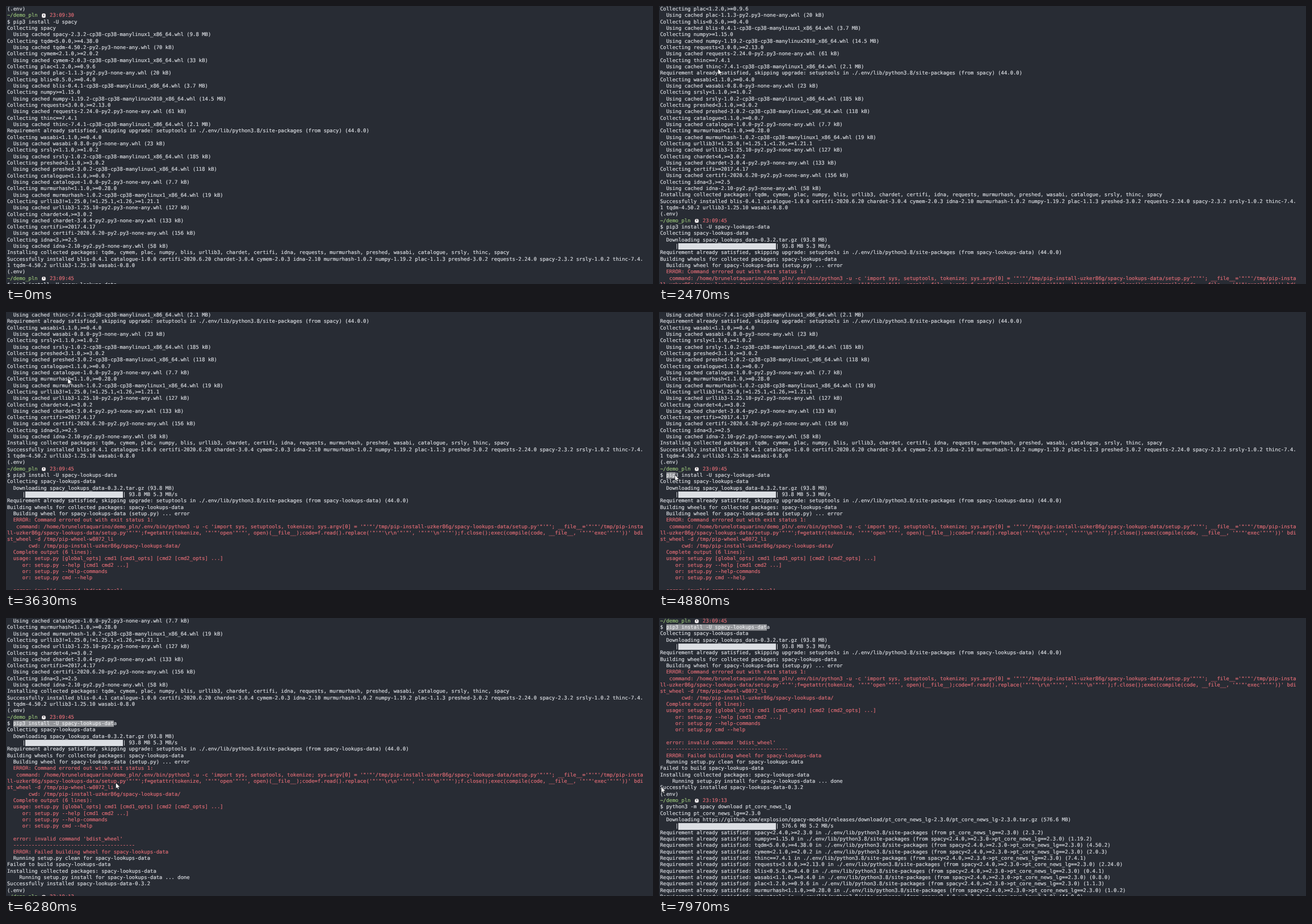
Write an HTML page that moves like this. It is 1140 by 491 pixels and loops after 8 s.

```html
<!DOCTYPE html>
<html lang="en">
<head>
<meta charset="utf-8">
<title>Terminal session</title>
<style>
  html, body { margin: 0; width: 100%; height: 100%; overflow: hidden; background: #282c34; }
  #stage { position: relative; width: 1140px; height: 491px; overflow: hidden; --row: 11.328125px; }
  #log {
    position: absolute; left: 2px; top: 0;
    font: 8.92px/12px "DejaVu Sans Mono", monospace;
    text-rendering: geometricPrecision; font-variant-ligatures: none;
    white-space: pre; color: #dcdfe4; -webkit-text-stroke: .2px;
  }
  #log div { position: relative; height: var(--row); }
  #log .red { color: #e06c75; }
  .green { color: #98c379; }
  .bar { display: inline-block; height: var(--row); vertical-align: top; background: #dcdfe4; }
  .clock {
    position: absolute; left: 60.9px; top: 1.9px; width: 7.6px; height: 7.6px;
    border-radius: 50%; background: #eceef0; box-shadow: inset 0 0 0 .5px #c9b9bb;
  }
  .clock::after {
    content: ""; position: absolute; left: 3.2px; top: 1.4px; width: 1.2px; height: 2.9px; background: #4a3338;
  }
  #pick { position: absolute; top: 0; height: var(--row); background: rgba(255, 255, 255, .5); }
  #pointer { position: absolute; left: 0; top: 0; width: 10px; height: 14px; overflow: visible; }
</style>
</head>
<body>
<div id="stage">
  <div id="log"></div>
  <svg id="pointer"><path d="M0 0V10.4L2.4 8.3 4 11.8 5.6 11.1 4.1 7.7H7.4Z" fill="#fff" stroke="#16181c" stroke-width=".6"/></svg>
</div>
<script>
// ROW is a whole number of 1/64 px, so stacked rows never drift from the scroll.
const LOOP = 8000, COL = 5.37, ROW = 725 / 64, LEFT = 2;
const log = document.getElementById('log');
const pointer = document.getElementById('pointer');

function span(text, cls) {
  const s = document.createElement('span');
  s.className = cls || '';
  s.textContent = text;
  return s;
}
function row(...parts) {
  const d = document.createElement('div');
  d.append(...parts);
  log.append(d);
  return d;
}
const print = text => text.split('\n').forEach(line => row(line));
const fail = text => text.split('\n').forEach(line => { row(line).className = 'red'; });
const prompt = time => row(span('~/demo_pln', 'green'), span('', 'clock'), '    ', span(time, 'red'));
const progress = text => row('     |', span(' '.repeat(32), 'bar'), '| ' + text);

const SITE = 'in ./.env/lib/python3.8/site-packages';
const LINUX = 'cp38-cp38-manylinux1_x86_64', ANY = 'py2.py3-none-any';
const MODEL = 'pt_core_news_lg';

function collect(name, range, version, tag, size) {
  print(`Collecting ${name}${range}\n  Using cached ${name}-${version}-${tag}.whl (${size})`);
}
const skip = from =>
  print(`Requirement already satisfied, skipping upgrade: setuptools ${SITE} (from ${from}) (44.0.0)`);
const satisfied = (spec, version, from = `spacy<2.4.0,>=2.3.0->${MODEL}==2.3.0`) =>
  print(`Requirement already satisfied: ${spec} ${SITE} (from ${from}) (${version})`);

print('(.env)');
prompt('23:09:30');
print('$ pip3 install -U spacy');
collect('spacy', '', '2.3.2', LINUX, '9.8 MB');
collect('tqdm', '<5.0.0,>=4.38.0', '4.50.2', ANY, '70 kB');
collect('cymem', '<2.1.0,>=2.0.2', '2.0.3', LINUX, '33 kB');
collect('plac', '<1.2.0,>=0.9.6', '1.1.3', ANY, '20 kB');
collect('blis', '<0.5.0,>=0.4.0', '0.4.1', LINUX, '3.7 MB');
collect('numpy', '>=1.15.0', '1.19.2', LINUX.replace('x1_', 'x2010_'), '14.5 MB');
collect('requests', '<3.0.0,>=2.13.0', '2.24.0', ANY, '61 kB');
collect('thinc', '==7.4.1', '7.4.1', LINUX, '2.1 MB');
skip('spacy');
collect('wasabi', '<1.1.0,>=0.4.0', '0.8.0', 'py3-none-any', '23 kB');
collect('srsly', '<1.1.0,>=1.0.2', '1.0.2', LINUX, '185 kB');
collect('preshed', '<3.1.0,>=3.0.2', '3.0.2', LINUX, '118 kB');
collect('catalogue', '<1.1.0,>=0.0.7', '1.0.0', ANY, '7.7 kB');
collect('murmurhash', '<1.1.0,>=0.28.0', '1.0.2', LINUX, '19 kB');
collect('urllib3', '!=1.25.0,!=1.25.1,<1.26,>=1.21.1', '1.25.10', ANY, '127 kB');
collect('chardet', '<4,>=3.0.2', '3.0.4', ANY, '133 kB');
collect('certifi', '>=2017.4.17', '2020.6.20', ANY, '156 kB');
collect('idna', '<3,>=2.5', '2.10', ANY, '58 kB');
print(`Installing collected packages: tqdm, cymem, plac, numpy, blis, urllib3, chardet, certifi, idna, requests, murmurhash, preshed, wasabi, catalogue, srsly, thinc, spacy
Successfully installed blis-0.4.1 catalogue-1.0.0 certifi-2020.6.20 chardet-3.0.4 cymem-2.0.3 idna-2.10 murmurhash-1.0.2 numpy-1.19.2 plac-1.1.3 preshed-3.0.2 requests-2.24.0 spacy-2.3.2 srsly-1.0.2 thinc-7.4.
1 tqdm-4.50.2 urllib3-1.25.10 wasabi-0.8.0
(.env)`);
prompt('23:09:45');
const picked = row('$ pip3 install -U spacy-lookups-data');
print(`Collecting spacy-lookups-data
  Downloading spacy_lookups_data-0.3.2.tar.gz (93.8 MB)`);
progress('93.8 MB 5.3 MB/s');
skip('spacy-lookups-data');
print(`Building wheels for collected packages: spacy-lookups-data
  Building wheel for spacy-lookups-data (setup.py) ... error`);
fail(String.raw`  ERROR: Command errored out with exit status 1:
   command: /home/brunelotaquarino/demo_pln/.env/bin/python3 -u -c 'import sys, setuptools, tokenize; sys.argv[0] = '"'"'/tmp/pip-install-uzker86g/spacy-lookups-data/setup.py'"'"'; __file__='"'"'/tmp/pip-insta
ll-uzker86g/spacy-lookups-data/setup.py'"'"';f=getattr(tokenize, '"'"'open'"'"', open)(__file__);code=f.read().replace('"'"'\r\n'"'"', '"'"'\n'"'"');f.close();exec(compile(code, __file__, '"'"'exec'"'"'))' bdi
st_wheel -d /tmp/pip-wheel-w8072_li
       cwd: /tmp/pip-install-uzker86g/spacy-lookups-data/
  Complete output (6 lines):
  usage: setup.py [global_opts] cmd1 [cmd1_opts] [cmd2 [cmd2_opts] ...]
     or: setup.py --help [cmd1 cmd2 ...]
     or: setup.py --help-commands
     or: setup.py cmd --help

  error: invalid command 'bdist_wheel'`);
fail('  ' + '-'.repeat(40) + '\n  ERROR: Failed building wheel for spacy-lookups-data');
print(`  Running setup.py clean for spacy-lookups-data
Failed to build spacy-lookups-data
Installing collected packages: spacy-lookups-data
    Running setup.py install for spacy-lookups-data ... done
Successfully installed spacy-lookups-data-0.3.2
(.env)`);
prompt('23:19:13');
print(`$ python3 -m spacy download ${MODEL}
Collecting ${MODEL}==2.3.0
  Downloading https://github.com/explosion/spacy-models/releases/download/${MODEL}-2.3.0/${MODEL}-2.3.0.tar.gz (576.6 MB)`);
progress('576.6 MB 5.2 MB/s');
satisfied('spacy<2.4.0,>=2.3.0', '2.3.2', MODEL + '==2.3.0');
satisfied('numpy>=1.15.0', '1.19.2');
satisfied('tqdm<5.0.0,>=4.38.0', '4.50.2');
satisfied('cymem<2.1.0,>=2.0.2', '2.0.3');
satisfied('thinc==7.4.1', '7.4.1');
satisfied('requests<3.0.0,>=2.13.0', '2.24.0');
satisfied('blis<0.5.0,>=0.4.0', '0.4.1');
satisfied('wasabi<1.1.0,>=0.4.0', '0.8.0');
satisfied('plac<1.2.0,>=0.9.6', '1.1.3');
satisfied('murmurhash<1.1.0,>=0.28.0', '1.0.2');
satisfied('setuptools', '44.0.0');

const pick = span('');
pick.id = 'pick';
pick.style.left = 2 * COL + 'px';
picked.append(pick);

// Each wheel tick scrolls three rows.
const ticks = [1450, 1990, 2470, 2770, 3090, 3400, 6040, 6140, 6270, 6350, 6430, 6510, 6740, 6890];

// Pointer moves: first step, last step, step count, end x, end y.
const moves = [
  [340, 510, 3, 1118, 480],
  [660, 1220, 8, 102, 113],
  [1450, 1610, 3, 103, 111],
  [2470, 2470, 1, 104, 111],
  [3400, 3630, 4, 109, 117],
  [3700, 4180, 7, 41, 284],
  [4240, 4520, 5, 3, 294],
  [4600, 4950, 5, 31, 287],
  [5050, 5810, 11, 188, 292],
  [5890, 5890, 1, 189, 292],
  [6040, 6590, 8, 198, 290],
  [6960, 7670, 10, 7, 299],
  [7740, 7740, 1, 7, 298],
  [7970, 7970, 1, 4, 298]
];
const PRESS = 4600, RELEASE = 5810;
const ease = p => p * p * (3 - 2 * p);

function pointerAt(t) {
  let x = 1140, y = 491;
  for (const [from, to, n, x1, y1] of moves) {
    if (t < from) break;
    const done = t >= to ? n : Math.floor((t - from) / (to - from) * (n - 1) + 1e-6) + 1;
    const p = ease(done / n);
    x += (x1 - x) * p;
    y += (y1 - y) * p;
    if (t < to) break;
  }
  return [x, y];
}

function draw(t) {
  const lines = 3 * ticks.filter(tick => tick <= t).length;
  log.style.transform = `translateY(${-lines * ROW}px)`;

  const [x, y] = pointerAt(t);
  pointer.style.transform = `translate(${x}px, ${y}px)`;
  pointer.style.visibility = t < moves[0][0] ? 'hidden' : 'visible';

  const end = t < PRESS ? 0 : Math.floor((pointerAt(Math.min(t, RELEASE))[0] - LEFT) / COL) + 1;
  pick.style.width = Math.max(0, end - 2) * COL + 'px';
}

const start = performance.now();
function tick(now) {
  draw(Math.max(0, now - start) % LOOP);
  requestAnimationFrame(tick);
}
draw(0);
requestAnimationFrame(tick);
</script>
</body>
</html>
```
